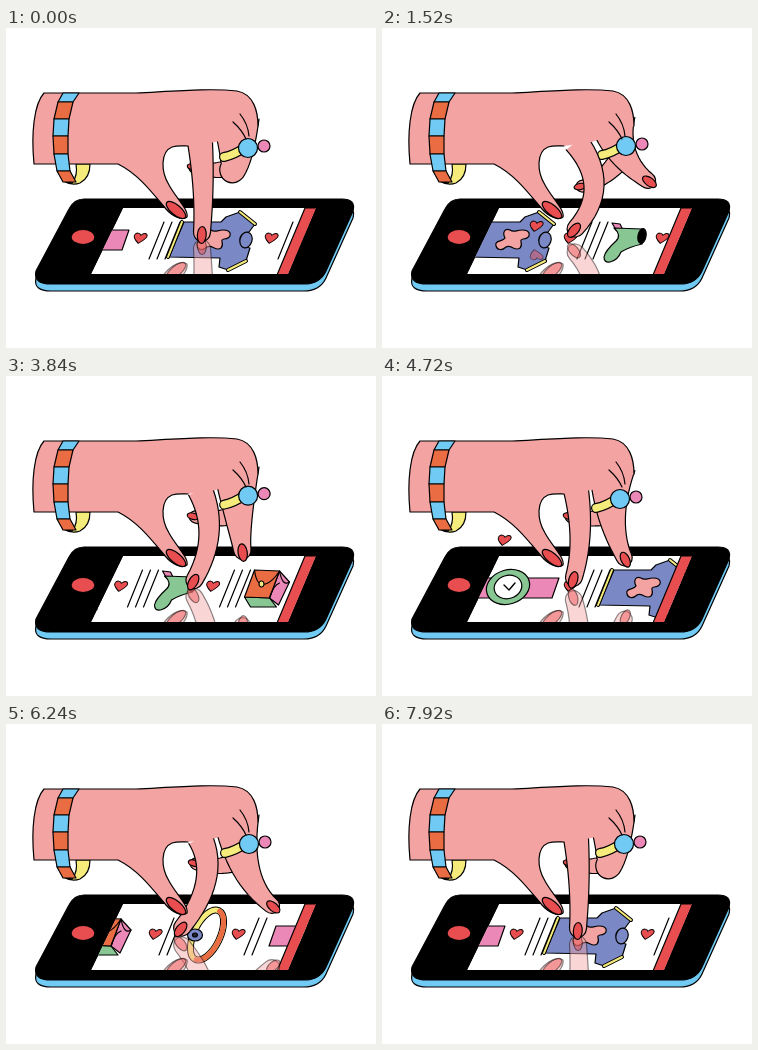
Recreate the animation shown at these times as an HTML page with a canvas. Size 370 px wide and 320 px high, loop 8 s.

```html
<!DOCTYPE html>
<html lang="en">
<head>
<meta charset="utf-8">
<title>Swiping hand</title>
<style>
html, body { margin: 0; width: 100%; height: 100%; overflow: hidden; background: #fff; }
canvas { display: block; width: 370px; height: 320px; }
</style>
</head>
<body>
<canvas id="stage" width="370" height="320"></canvas>
<script>
const ctx = document.getElementById('stage').getContext('2d');
const LOOP = 8000, STEP = 80, STRIP = 550, MIRROR = 425;
const C = {
  ink: '#000', skin: '#f4a3a3', red: '#e84d4f', blue: '#70caf3', orange: '#ea6c43',
  yellow: '#f6ec7b', shirt: '#7b88c6', green: '#88c793', pink: '#ec88b7', white: '#fff'
};

// time, scroll, index mid and tip, middle mid and tip, middle tip width, third fingertip, jewel
const POSES = [
  [0, 134, 197, 160, 196, 204, 230, 124, 227, 141, 13, 190, 140, 242, 120],
  [1520, 57, 212, 158, 194, 200, 241, 126, 265, 152, 8, 201, 158, 244, 118],
  [2880, -33, 207, 158, 190, 206, 234, 135, 230, 165, 11, 190, 141, 245, 118],
  [3520, -60, 204, 158, 188, 204, 233, 138, 235, 172, 9, 190, 141, 243, 119],
  [4720, 188, 198, 160, 192, 201, 230, 140, 242, 181, 8, 190, 141, 238, 123],
  [5600, 341, 200, 155, 174, 203, 240, 145, 265, 181, 8, 191, 140, 243, 120],
  [6880, 409, 200, 158, 179, 203, 240, 145, 265, 181, 8, 191, 140, 243, 120]
];
POSES.push([7920, 684, ...POSES[0].slice(2)]);

const LIKES = [1360, 4160, 5010, 6520];
const LIKE_PATH = [[0, 185, 210], [0.2, 154, 198], [0.45, 143, 173], [0.7, 122, 164], [1, 113, 152]];

const PHONE = new Path2D('M78 171H336Q350 171 347 183L320 243Q314 256 298 256H45Q27 256 30 243L63 181Q68 171 78 171Z');
const SCREEN = new Path2D('M117 180H310L282 246H85Z');
const PALM = 'M252 98C252 84 248 66 231 63C205 60 170 63 130 65L38 65C28 76 25 105 28 136L112 136' +
  'C132 146 145 163 160 181C166 188 176 193 181 189C183 182 170 170 163 157C155 144 154 124 166 119C172 117 178 118 182 118';
const palmLine = new Path2D(PALM), palmFill = new Path2D(PALM + 'L210 114Z');
const HEART = new Path2D('M0 6C-4 3-8 0-7-3C-6-6-2-6 0-3C2-6 6-6 7-3C8 0 4 3 0 6Z');

function paint(path, fill, line = C.ink, width = 1.2) {
  if (typeof path === 'string') path = new Path2D(path);
  if (fill) { ctx.fillStyle = fill; ctx.fill(path); }
  if (line) { ctx.strokeStyle = line; ctx.lineWidth = width; ctx.stroke(path); }
}

function oval(x, y, rx, ry, fill, turn = 0, line = C.ink) {
  const p = new Path2D();
  p.ellipse(x, y, rx, ry, turn, 0, Math.PI * 2);
  paint(p, fill, line);
}

function at(x, y, draw) {
  ctx.save();
  ctx.translate(x, y);
  draw();
  ctx.restore();
}

function heart(x, y) {
  at(x, y, () => {
    ctx.transform(0.9, 0.05, -0.3, 0.9, 0, 0);
    paint(HEART, C.red, C.ink, 1);
  });
}

function sample(keys, t) {
  let i = 0;
  while (i < keys.length - 2 && t >= keys[i + 1][0]) i++;
  const a = keys[i], b = keys[i + 1];
  const u = Math.max(0, Math.min(1, (t - a[0]) / (b[0] - a[0])));
  const e = u * u * (3 - 2 * u);
  return a.map((v, k) => v + (b[k] - v) * e);
}

// Goods on the screen, each around its own centre
function shirt() {
  paint('M-29-17H8L13-22L27-27L42-15L36-7Q26-5 27 1Q28 8 37 9L33 22L15 31L6 28L7 19L-44 18Z', C.shirt);
  paint('M-31-17L-45 18M27-27L42-15M33 22L15 31', null, C.ink, 4);
  paint('M-31-17L-45 18M27-27L42-15M33 22L15 31', null, C.yellow, 2);
  oval(33, 1, 6, 8, C.shirt, 0.3);
  paint('M-16 7C-18 1-9 3-7-1C-10-7-7-11-2-9C2-6 4-9 10-9C20-9 19 0 11 0C6 1 12 5 8 9C3 13-1 5-6 8C-10 12-15 11-16 7Z', C.skin);
}

function boot() {
  paint('M-13-16L-5-15L-2-9L-9-9Z', C.pink);
  paint('M17-10L-11-11Q-3-4-9 2Q-20 12-21 18Q-21 24-15 23Q-7 21-4 13Q4 8 17 5Z', C.green);
  oval(17, -3, 4, 7.5, C.ink, 0.2);
}

function bag() {
  paint('M-21 10L-15 20L11 20L4 11Z', C.green);
  paint('M14-16L24-5L13 18L4 11Z', C.pink);
  paint('M-11-17L14-16L4 11L-21 10Z', C.orange);
  paint('M14-16Q7-5 0-3Q-9 0-11-17M14-16Q17 0 24-5M4 11Q8-2 14-4', null);
  oval(-4, -3, 2.5, 3, C.yellow);
}

function bangle() {
  const ring = (from, to, color, width) => {
    const p = new Path2D();
    p.ellipse(0, 0, 13, 27, 0.45, from, to);
    paint(p, null, color, width);
  };
  ring(0, 7, C.ink, 7);
  ring(0, 7, C.yellow, 5);
  ring(-1.5, 1.5, C.orange, 5);
  oval(-12, 0, 7.5, 6, C.shirt);
  oval(-12, 0, 2.5, 2, '#223');
}

function watch() {
  paint('M-43-9H51L44 11H-50Z', C.pink);
  oval(0, 0, 22, 17, C.green, -0.3);
  oval(0, 0, 14, 11.5, C.white, -0.3);
  paint('M-4-2L1 3L7-4', null, C.ink, 1.4);
}

// heart offset, item offset, first line offset, line count
const GOODS = [
  [0, 73, 9, 3, shirt], [131, 186, 7, 3, boot], [223, 276, 7, 3, bag],
  [324, 376, 4, 2, bangle], [407, 488, 6, 2, watch]
];

function goods(scroll) {
  const start = ((scroll % STRIP) + STRIP) % STRIP;
  for (const base of [start - STRIP, start]) {
    for (const [h, x, gap, count, draw] of GOODS) {
      if (base + x < 20 || base + h > 320) continue;
      for (let i = 0; i < count; i++) {
        const lx = base + h + gap + i * 8;
        paint(`M${lx} 231L${lx + 15} 194`, null);
      }
      at(base + x, 211, draw);
      heart(base + h, 210);
    }
  }
}

// A tapered finger whose centre line passes through mid
function finger(bx, by, mx, my, tx, ty, w0, w1, nail) {
  const cx = 2 * mx - (bx + tx) / 2, cy = 2 * my - (by + ty) / 2;
  const left = [], right = [];
  let angle = 0;
  for (let i = 0; i <= 16; i++) {
    const u = i / 16, v = 1 - u;
    const x = v * v * bx + 2 * u * v * cx + u * u * tx;
    const y = v * v * by + 2 * u * v * cy + u * u * ty;
    angle = Math.atan2(v * (cy - by) + u * (ty - cy), v * (cx - bx) + u * (tx - cx));
    const w = w1 + (w0 - w1) * v ** 1.4;
    left.push([x - Math.sin(angle) * w, y + Math.cos(angle) * w]);
    right.unshift([x + Math.sin(angle) * w, y - Math.cos(angle) * w]);
  }
  const p = new Path2D();
  left.forEach(([x, y]) => p.lineTo(x, y));
  p.ellipse(tx, ty, w1 + 1, w1, angle, Math.PI / 2, -Math.PI / 2, true);
  right.forEach(([x, y]) => p.lineTo(x, y));
  paint(p, C.skin);
  if (nail) oval(tx + Math.cos(angle) * 3, ty + Math.sin(angle) * 3, w1, w1 * 0.52, C.red, angle);
}

function jewel(x, y) {
  const band = `M${x - 24} ${y + 9}Q${x - 14} ${y + 7} ${x - 4} ${y}`;
  paint(band, null, C.ink, 10);
  paint(band, null, C.yellow, 7.6);
  oval(x + 16, y - 2, 6, 6, C.pink);
  oval(x, y, 9.5, 9.5, C.blue);
}

function hand(p) {
  const [, , ix, iy, tx, ty, mx, my, nx, ny, nw, rx, ry, jx, jy] = p;
  finger(234, 136, (234 + rx) / 2, (136 + ry) / 2 + 4, rx, ry, 10, 6, true);
  finger(230, 92, mx, my, nx, ny, 23, nw, nw < 9.5);
  jewel(jx, jy);
  finger(194, 114, ix, iy, tx, ty, 12.5, 8.5, true);
  paint(palmFill, C.skin, null);
  paint(palmLine, null);
  paint('M227 94Q236 102 240 111M234 86Q242 96 243 108', null);
  oval(170, 182, 12, 5, C.red, 0.7);
}

function bracelet() {
  const ys = [65, 74, 91, 108, 126, 143, 154];
  const ls = [57, 52, 48, 47, 48, 51, 57];
  const rs = [73, 67, 63, 62, 62, 64, 70];
  for (let i = 0; i < 6; i++) {
    paint(`M${ls[i]} ${ys[i]}L${rs[i]} ${ys[i]}L${rs[i + 1]} ${ys[i + 1]}L${ls[i + 1]} ${ys[i + 1]}Z`,
      i % 2 ? C.orange : C.blue);
  }
}

function likes(t) {
  for (const start of LIKES) {
    const u = (t - start) / 800;
    if (u < 0 || u >= 1) continue;
    const [, x, y] = sample(LIKE_PATH, u);
    ctx.globalAlpha *= Math.min(1, (1 - u) * 5);
    heart(x, y);
  }
}

function mirrored(draw) {
  ctx.save();
  ctx.globalAlpha = 0.45;
  ctx.transform(1, 0, 0, -1, 0, MIRROR);
  draw();
  ctx.restore();
}

function render(t) {
  const pose = sample(POSES, t);
  ctx.fillStyle = C.white;
  ctx.fillRect(0, 0, 370, 320);

  at(0, 7, () => paint(PHONE, C.blue));
  paint(PHONE, C.ink);
  oval(77, 209, 12, 7.5, C.red);

  ctx.save();
  ctx.clip(SCREEN);
  paint(SCREEN, C.white, null);
  goods(pose[1]);
  paint('M299 180H311L283 247H271Z', C.red);
  mirrored(() => { likes(t); });
  mirrored(() => hand(pose));
  ctx.restore();

  paint('M57 153Q66 158 74 155Q84 150 84 136H70Q72 148 66 155Z', C.yellow);
  hand(pose);
  bracelet();
  at(0, 0, () => likes(t));
}

ctx.lineJoin = ctx.lineCap = 'round';
const begin = performance.now();
function tick() {
  const t = (performance.now() - begin) % LOOP;
  render(Math.floor(t / STEP) * STEP);
  requestAnimationFrame(tick);
}
tick();
</script>
</body>
</html>
```
